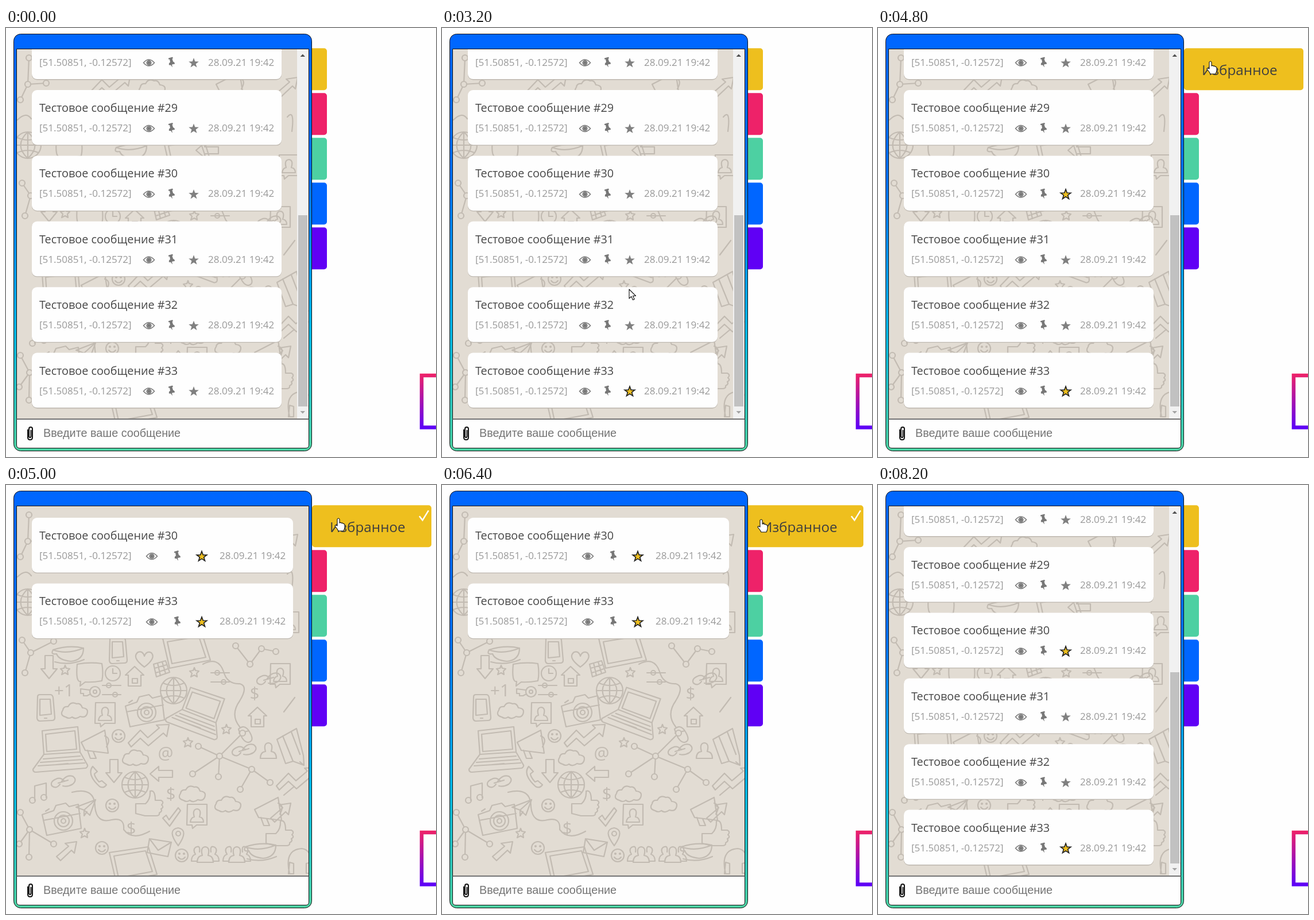
Recreate the animation shown at these times as an HTML page. Size 749 by 747 pixels, loop 8.6 s.

```html
<!DOCTYPE html>
<html lang="ru">
<head>
<meta charset="utf-8">
<style>
  html, body { margin: 0; width: 100%; height: 100%; overflow: hidden; background: #fefefe; }
  svg { display: block; width: 749px; height: 747px; }
  text { font-family: "Open Sans", "Noto Sans", sans-serif; }
  .title { font-size: 19.8px; fill: #474747; }
  .meta { font-size: 17px; fill: #999; }
  .doodle { fill: none; stroke: #c2bbb2; stroke-width: 2.2; stroke-linejoin: round; stroke-linecap: round; }
  .doodle text { font: 30px "Open Sans", sans-serif; text-anchor: middle; fill: #c2bbb2; stroke: none; }
</style>
</head>
<body>
<svg viewBox="0 0 749 747">
  <defs>
    <linearGradient id="frame" x2="0" y2="1">
      <stop offset="0" stop-color="#0066ff"/><stop offset=".35" stop-color="#0072ff"/>
      <stop offset=".7" stop-color="#00b6e8"/><stop offset="1" stop-color="#4dd2a2"/>
    </linearGradient>
    <linearGradient id="badge" gradientUnits="userSpaceOnUse" x1="0" y1="602" x2="0" y2="699">
      <stop offset="0" stop-color="#ee2268"/><stop offset="1" stop-color="#5a00fa"/>
    </linearGradient>
    <clipPath id="chat"><rect x="19" y="37" width="508" height="643"/></clipPath>
    <g id="eye" fill="none" stroke="#777" stroke-width="1.5">
      <path d="M-9.5 0Q0-11 9.5 0Q0 11-9.5 0Z"/>
      <circle r="3.8" fill="#999"/><circle r="1.5" fill="#666"/>
    </g>
    <path id="pin" fill="#777" d="M-5-7L2-9L3-7L1.500-6L3-1Q6 0 6 3L1 4L2 9L-1 5L-4 5Q-5 2-2 0L-3-5L-5-5Z"/>
    <path id="star" d="M0-9L2.300-2.900L8.800-2.700L3.600 1.300L5.500 7.500L0 3.900L-5.500 7.500L-3.600 1.300L-8.800-2.700L-2.300-2.900Z"/>
  </defs>

  <path d="M749 605H724V695.500H749" fill="none" stroke="url(#badge)" stroke-width="6.500"/>
  <g id="tabs"></g>
  <rect x="13.500" y="10.500" width="519" height="726" rx="12" fill="url(#frame)" stroke="#111"/>
  <path d="M18.500 36.500H527.500V726Q527.500 731.500 522 731.500H24Q18.500 731.500 18.500 726Z" fill="#fefefe" stroke="#111"/>
  <g clip-path="url(#chat)">
    <rect x="19" y="37" width="508" height="643" fill="#e2dcd3"/>
    <g id="wallpaper" class="doodle"></g>
    <g id="allCards"></g>
    <g id="starredCards"></g>
    <g id="scrollbar">
      <path d="M507 37H526.500V680H507Z" fill="#f1f1f1"/>
      <path d="M509 326H525V659H509Z" fill="#c1c1c1"/>
      <path d="M512.500 50L516.800 45.500L521 50Z" fill="#505050"/>
      <path d="M512.500 667L516.800 671.500L521 667Z" fill="#a3a3a3"/>
    </g>
  </g>
  <path d="M18 681H528" stroke="#444" stroke-width="1.300"/>
  <g transform="translate(42 706)" fill="none" stroke="#111" stroke-width="2">
    <path d="M-4-7V7Q-4 11 0 11Q4 11 4 7V-8Q4-11 1-11Q-2-11-2-8V5Q-2 7 0 7Q1.500 7 1.500 5V-6"/>
  </g>
  <text x="65" y="712" fill="#757575" style="font:19.8px 'Liberation Sans',Arial,sans-serif">Введите ваше сообщение</text>
  <g id="cursor" stroke="#111" stroke-width="1.100" stroke-linejoin="round" fill="#fff">
    <path id="arrow" d="M0 0V16L3.800 12.500L6.500 18.500L9.200 17.300L6.500 11.500H11.500Z"/>
    <path id="hand" d="M-2 1.500Q0-1.500 2 1.500V8Q4 6.500 5.500 8.500Q7.500 7.500 8.500 9.500Q11 9 11 12V16Q11 18 9 22H0Q-2 18-6 13.500Q-6 10.500-2 13Z"/>
  </g>
</svg>
<script>
const LOOP = 8600, STEP = 200;
const $ = id => document.getElementById(id);
const show = (el, on) => el.setAttribute("display", on ? "inline" : "none");
const place = (el, x, y) => el.setAttribute("transform", `translate(${x} ${y})`);

// Wallpaper doodles, each drawn around its own centre
const ring = (r, x = 0, y = 0) => `M${x - r} ${y}a${r} ${r} 0 1 0 ${2 * r} 0a${r} ${r} 0 1 0 ${-2 * r} 0`;
const person = "M-14 14Q-14 3-5 2Q-9-12 0-13Q9-12 5 2Q14 3 14 14Z";
const doodles = {
  cloud: "M-16 11Q-27 8-21-1Q-20-8-12-7Q-7-17 3-12Q10-14 13-5Q25-4 21 6Q18 13 9 10Q2 16-5 11Q-10 15-16 11Z",
  globe: ring(23) + "M-23 0H23M0-23V23M0-23Q-25 0 0 23Q25 0 0-23M-18-13Q0-5 18-13M-18 13Q0 5 18 13",
  clock: ring(13) + "M0-8V0H7",
  house: "M-16-3L0-18L16-3H11V16H-11V-3ZM-4 3H5V11H-4Z",
  heart: "M0 14Q-23-3-11-12Q-3-15 0-5Q4-15 12-11Q21-2 0 14Z",
  bubble: "M-22-16Q0-20 21-17Q24 0 21 13Q5 16-8 15L-17 22L-16 14Q-25 16-22-16Z",
  contact: "M-16-19H18V17H0L-7 23L-8 17H-17ZM-11 12Q-10 4-4 3Q-8-10 1-11Q9-10 5 3Q12 4 12 12Z",
  person,
  people: person + "M10-4Q8-17 17-12Q22-8 17 0Q24 2 24 12H14M-10-4Q-8-17-17-12Q-22-8-17 0Q-24 2-24 12H-14",
  smiley: ring(11) + ring(1, -4, -3) + ring(1, 4, -3) + "M-6 3Q0 10 6 3",
  star: "M0-8L2-3L8-2L4 2L5 8L0 5L-6 8L-4 2L-8-2L-2-3Z",
  phone: "M-13-19Q-13-23-9-23H9Q13-23 14-18L17 17Q17 22 12 22L-9 23Q-13 23-14 18ZM-9-15H9L11 11L-9 13ZM-1 18H3",
  camera: "M-32-8L-12-15L-8-24L9-28L15-22L31-26L36 16L-24 28ZM-30 2L34-10M-26-14L-20-18" + ring(16, 5, 3) + ring(10, 5, 3) + ring(4, 5, 3),
  laptop: "M-32-32L30-39L34 5L-29 9ZM-26-26L25-32L28 0L-24 4ZM-29 9L-48 35Q-48 40-43 40L44 33Q49 30 46 26L34 5M-30 17L34 12M-35 23L38 18M-39 29L42 24M-8 27L13 25",
  tablet: "M-40-18L28-28L43 20L-28 34ZM-32-12L23-21L35 15L-24 26Z",
  arrowDown: "M-7-21H7V2H14L0 19L-14 2H-7Z",
  arrowLeft: "M-19 0L-4-13V-6H20V6H-4V13Z",
  arrowUp: "M-17 10L4-8L-2-13L18-16L14 4L9-1L-10 17Z",
  zigzag: "M-34 12L-13-10L0 3L20-14L15-19L37-20L33 1L27-5L1 17L-13 4L-29 19Z",
  sliders: "M-16-8H16M-16 8H16" + ring(4, -5, -8) + ring(4, 6, 8),
  key: ring(9, 8) + ring(3, 8) + "M-1-3L-17-5V3H-12V7H-6L0 4",
  chain: "M-6 4Q-12 13-20 7Q-24 0-13-5Q-5-9 2-1M-3-1Q5-13 16-10Q25-4 16 4Q8 9-1 7M-9 2L8-3",
  megaphone: "M-24-2L17-23L23 17L-17 12ZM-13 12L-8 26H2L-3 14M17-13Q29-9 20 6",
  plane: "M-16 1L18-12L8 15L-2 6ZM-2 6L18-12M-2 6V16L3 9",
  thumb: "M-24 0H-7Q2-8 1-22Q10-25 10-6H20Q26-3 21 2Q26 6 20 9Q23 13 17 16Q18 21 11 21H-8L-24 17Z",
  check: "M-15 3L-9-2L-4 6L12-15L16-10L-3 17Z",
  marker: "M0 16Q-21-12 0-15Q19-11 0 16Z" + ring(4, 0, -5),
  envelope: "M-18-14L20-8L14 17L-22 10ZM-18-14L-3 6L20-8",
  bowl: "M-28-5Q0-14 25-8Q25 13 3 15Q-18 13-22 2Q-33 4-28-5ZM-28-5Q-4 4 25-8M-25 16Q0 23 26 12",
  pencil: "M-23-12L11-31L23 16L24 33L5 26L-8 30ZM5 26L-13-18M17 14L2-25M24 33L17 27",
  kite: "M-13-8L8-14L15 6L-8 14ZM-11-1L10-7M-9 7L12 0M-6-10L-1 12M2-12L8 8",
  note: "M-8 12V-13L12-18V7" + ring(5, -12, 12) + ring(5, 8, 7),
  mouse: "M-10-7Q0-16 8-4Q19 13 8 16Q-3 17-10-7ZM-9 0L8-4",
  headphones: "M-16 22Q-26-20 5-22Q26-20 22 20M-16 2L-9 4V22H-18ZM22 2L13 4V21H22Z",
  handset: "M-19-18Q-30-4-7 17Q0 21 5 14L-3 7L-8 9Q-16 0-16-5L-11-9Z"
};
const spots = {
  cloud: "120,393 226,475 325,538 387,556 255,104", globe: "38,204 292,358 225,522", clock: "186,328",
  house: "224,334 438,405", heart: "241,303", bubble: "146,328 110,210", contact: "172,398 477,330 332,575 492,240",
  person: "457,462", people: "347,643 402,643", smiley: "196,437 185,558 306,645 167,632",
  star: "103,322 328,326 384,425 317,448 137,606", phone: "68,388 194,288", camera: "240,393 95,582",
  laptop: "95,460", tablet: "220,658 313,285 315,217", arrowDown: "75,318 188,499", arrowLeft: "270,503 350,213",
  arrowUp: "105,637 478,570 490,102", zigzag: "247,437 505,512 180,100", sliders: "184,357 373,335", key: "147,360",
  chain: "458,338 415,462 100,517", megaphone: "155,450 457,567 390,100", plane: "138,560", thumb: "250,555 477,607",
  check: "288,577", marker: "300,612", envelope: "268,630", bowl: "110,292 445,635 220,213", pencil: "495,455",
  kite: "270,320", note: "58,537", mouse: "415,432", headphones: "510,655", handset: "170,508"
};
const label = (text, x, y) => `<text x="${x}" y="${y}">${text}</text>`;
const web = (nodes, links) =>
  `<path d="${links}"/><path fill="#e2dcd3" d="${nodes.map(([x, y]) => ring(5, x, y)).join("")}"/>`;

$("wallpaper").innerHTML = Object.entries(spots).map(([name, list]) =>
  list.split(" ").map(p => `<path d="${doodles[name]}" transform="translate(${p})"/>`).join("")).join("") +
  `<path d="${doodles.laptop}" transform="translate(337 395) rotate(25)"/>` +
  label("+1", 101, 368) + label("@", 278, 477) + label("$", 433, 373) + label("$", 287, 548) + label("$", 218, 608) +
  web([[372, 472], [335, 455], [412, 432], [325, 503], [370, 508], [428, 495], [460, 518], [408, 530]],
      "M335 455L372 472L412 432M325 503L372 472L370 508M372 472L428 495L460 518M428 495L408 530") +
  web([[43, 292], [28, 270], [83, 272], [33, 327]], "M28 270L43 292L83 272M43 292L33 327") +
  web([[41, 600], [25, 570], [83, 625], [40, 648], [23, 625]], "M25 570L41 600L83 625M40 648L41 600L23 625") +
  web([[38, 98], [70, 96], [25, 125], [40, 52]], "M40 52L38 98L70 96M38 98L25 125") +
  web([[425, 312], [445, 285], [400, 280], [470, 290]], "M400 280L425 312L445 285L470 290") +
  `<path d="M343 312Q370 298 379 325Q385 347 407 346Q423 350 407 376Q390 400 407 421
    M115 535Q155 525 155 561Q158 590 184 583Q207 578 205 600Q220 620 250 603
    M490 155Q503 140 498 180M484 395L503 370M484 540L502 525M20 160Q35 145 44 158"/>`;

// Message cards
function card(number, y, wide) {
  const [width, eye, pin, star, date] = wide ? [455, 254, 298, 341, 372] : [435, 249, 288, 327, 352];
  return `<g transform="translate(0 ${y})">
    <rect x="45" y="1.300" width="${width}" height="95.500" rx="9" fill="#bdb7af"/>
    <rect x="45" width="${width}" height="95.500" rx="9" fill="#fefefe"/>
    <text class="title" x="58" y="38">Тестовое сообщение #${number}</text>
    <text class="meta" x="58" y="72">[51.50851, -0.12572]</text>
    <use href="#eye" x="${eye}" y="67"/><use href="#pin" x="${pin}" y="66"/>
    <use href="#star" x="${star}" y="67.500" data-star="${number}"/>
    <text class="meta" x="${date}" y="72">28.09.21 19:42</text></g>`;
}
const PITCH = 114.4;
$("allCards").innerHTML = [28, 29, 30, 31, 32, 33].map((n, i) => card(n, 108 + PITCH * (i - 1))).join("");
$("starredCards").innerHTML = [30, 33].map((n, i) => card(n, 57 + PITCH * i, true)).join("");

const TAB_MIN = 559;
$("tabs").innerHTML = ["#eebf1e", "#ee2269", "#4dd0a2", "#0066ff", "#6000f5"].map((fill, i) =>
  `<g transform="translate(${TAB_MIN} ${35.3 + 78 * i})"><rect x="-208" width="208" height="73" rx="5" fill="${fill}"/>${i ? "" :
    `<text x="-177" y="46.500" font-size="24.200" fill="#3f3f3f">Избранное</text>
     <path id="tick" d="M-21 19L-15.500 26L-5 9" fill="none" stroke="#fff" stroke-width="2.500"/>`}</g>`).join("");
const favTab = $("tabs").firstElementChild;

// Timeline: [time, ...values]
const cursorKeys = [[1200, 430, 760], [1600, 351, 673], [2000, 327, 630], [2600, 327, 630], [3200, 326, 455],
  [3600, 325, 287], [4200, 325, 287], [4600, 579, 58], [5200, 579, 58], [5600, 450, 150], [6000, 450, 150],
  [6400, 556, 60], [6800, 579, 64], [7600, 579, 64], [8000, 770, 150]];
const tabKeys = [[4400, TAB_MIN], [4800, 741], [5200, 741], [5600, TAB_MIN], [6200, TAB_MIN], [6400, 734],
  [6600, 741], [7600, 741], [8000, TAB_MIN]];
const starredAt = { 33: 2200, 30: 3800 };

function sample(keys, t) {
  const next = keys.findIndex(k => k[0] > t);
  if (next < 0) return keys[keys.length - 1].slice(1);
  if (next === 0) return keys[0].slice(1);
  const a = keys[next - 1], b = keys[next], p = (t - a[0]) / (b[0] - a[0]);
  return a.slice(1).map((v, i) => v + (b[i + 1] - v) * p);
}

function render(t) {
  const filtered = t >= 5000 && t < 7200;
  show($("allCards"), !filtered);
  show($("scrollbar"), !filtered);
  show($("starredCards"), filtered);
  show($("tick"), filtered);

  document.querySelectorAll("[data-star]").forEach(el => {
    const gold = t >= starredAt[el.dataset.star];
    el.setAttribute("fill", gold ? "#eebf1e" : "#808080");
    el.setAttribute("stroke", gold ? "#222" : "none");
    el.setAttribute("stroke-width", 1.7);
  });

  const [right] = sample(tabKeys, t);
  place(favTab, right, 35.3);

  const [x, y] = sample(cursorKeys, t);
  const overTab = x > 533 && x < right && y > 35 && y < 108;
  const overStar = Math.abs(x - 327) < 10 && [289, 632].some(cy => Math.abs(y - cy) < 10);
  const pointing = overTab || overStar;
  show($("hand"), pointing);
  show($("arrow"), !pointing);
  place($("cursor"), x, y);
}

const start = performance.now();
function tick() {
  const t = (performance.now() - start) % LOOP;
  render(Math.min(Math.floor(t / STEP) * STEP, 8200));
  requestAnimationFrame(tick);
}
render(0);
requestAnimationFrame(tick);
</script>
</body>
</html>
```
